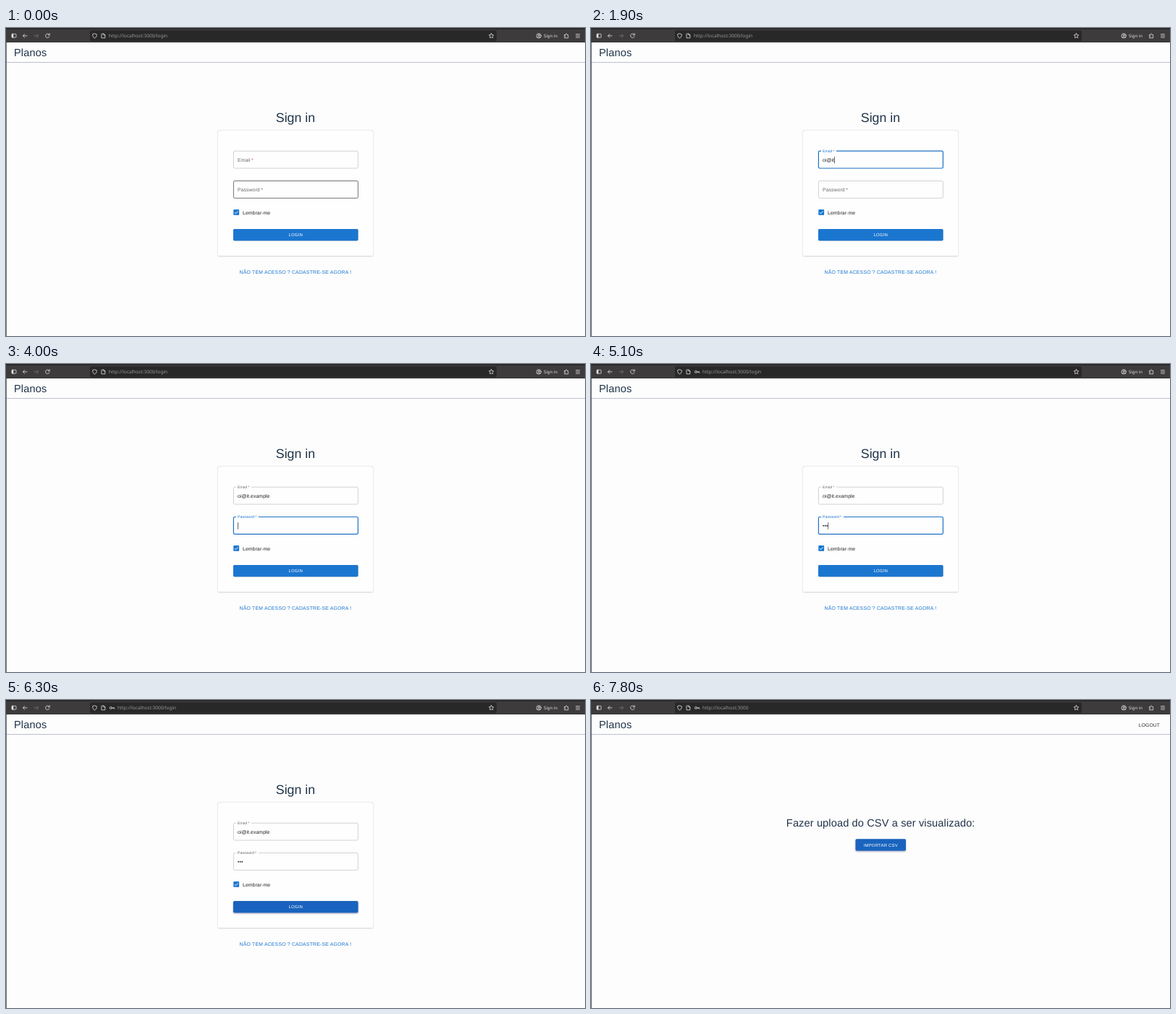
Animation of 800x426 px, one loop 8000 ms. Source, as an HTML page:

```html
<!DOCTYPE html>
<html lang="pt">
<head>
<meta charset="utf-8">
<title>Sign in</title>
<style>
  html, body { margin: 0; width: 100%; height: 100%; overflow: hidden; background: #fdfdfd; }
  svg { display: block; width: 800px; height: 426px; }
  text { font: 6.88px "Liberation Sans", Arial, sans-serif; letter-spacing: .00938em; text-rendering: geometricPrecision; white-space: pre; }
  .chrome text { font-family: "Noto Sans", sans-serif; letter-spacing: 0; }
  .icon { fill: none; stroke: #e2e0e2; stroke-width: .8; stroke-linecap: round; stroke-linejoin: round; }
  .dim { stroke: #777577; }
  .solid { fill: #e2e0e2; stroke: none; }
  .url { font-size: 6.5px; fill: #99979a; }
  .heading { font-size: 14.62px; letter-spacing: .00735em; fill: #20344a; }
  .title { font-size: 17.8px; letter-spacing: 0; }
  .mid { text-anchor: middle; }
  .body { fill: #222427; }
  .hint { fill: #a3a3a3; }
  .caps { letter-spacing: .02857em; }
  .white { font-size: 6.02px; fill: #fff; }
  .card { fill: #fefefe; filter: drop-shadow(0 .7px .7px #0005) drop-shadow(0 .3px 1px #0003); }
</style>
</head>
<body>
<svg viewBox="0 0 800 426">
  <defs><clipPath id="loginClip"><rect x="314" y="278" width="172.5" height="16.3" rx="1.7"/></clipPath></defs>
  <rect width="800" height="426" fill="#fdfdfd"/>

  <g class="chrome">
    <rect width="800" height="20" fill="#3d3b3c"/>
    <rect width="800" height="2" fill="#2b292a"/>
    <rect x="116" y="3.4" width="562" height="14.8" rx="1.8" fill="#292829"/>
    <g class="icon">
      <rect x="8" y="8.2" width="6" height="5" rx=".8"/><path class="solid" d="M8 8.2h2.3v5H8z"/>
      <path d="M29 10.8h-5.6m2.4-2.4-2.4 2.4 2.4 2.4"/>
      <path class="dim" d="M39 10.8h5.6m-2.4-2.4 2.4 2.4-2.4 2.4"/>
      <path d="M59.8 9.2a2.8 2.8 0 1 0 .3 2.4M60.3 7.6v2.1h-2.1"/>
      <path d="M122.5 7.8l2.8 1c0 2.6-.7 4.3-2.8 5.4-2.1-1.1-2.8-2.8-2.8-5.4z"/>
      <path d="M132.4 8h2.7l1.8 1.8v4h-4.5zM135 8v1.9h1.9"/>
      <path id="key" d="M146.4 10.9h3.4v1.2M148.3 10.9v1M146.4 10.9a1.5 1.5 0 1 0-3 0a1.5 1.5 0 1 0 3 0"/>
      <path d="M670.5 7.4l1 2.1 2.3.3-1.7 1.6.4 2.3-2-1.1-2 1.1.4-2.3-1.7-1.6 2.3-.3z"/>
      <circle cx="736.2" cy="10.8" r="3.2"/><circle cx="736.2" cy="9.9" r="1.1"/><path d="M734.2 13c.8-1.5 3.2-1.5 4 0"/>
      <path d="M771.7 9.5h1.6c-.5-2.2 2.4-2.2 1.9 0h1.5v4.3h-5v-1.5c1.7.4 1.7-1.9 0-1.4z"/>
      <path d="M787.5 8.6h5M787.5 10.8h5M787.5 13h5"/>
    </g>
    <text id="url" class="url" y="13.2"></text>
    <text x="743" y="13" style="font-size:6px" fill="#e2e0e2">Sign in</text>
  </g>

  <path d="M0 20h1v406H0z" fill="#6d6c6e"/>
  <path d="M1 47.6h799" stroke="#b9bdd0" stroke-width="1"/>
  <text class="heading" x="11" y="39.2">Planos</text>

  <g id="loginPage">
    <text class="heading title mid" x="400" y="129.5">Sign in</text>
    <rect class="card" x="293" y="142" width="214" height="173.5" rx="1.7"/>
    <g id="fields"></g>
    <rect x="314.3" y="251" width="7.8" height="7.8" rx=".9" fill="#1976d2"/>
    <path d="M315.9 255l1.6 1.7 3.1-3.4" fill="none" stroke="#fff" stroke-width=".95"/>
    <text class="body" x="327" y="257.7">Lembrar-me</text>
    <rect id="loginButton" x="314" y="278" width="172.5" height="16.3" rx="1.7"/>
    <circle id="ripple" cx="400.5" cy="286" fill="#fff" clip-path="url(#loginClip)"/>
    <text class="caps white mid" x="400.2" y="288.3">LOGIN</text>
    <text class="caps mid" x="400" y="339.8" fill="#1976d2">NÃO TEM ACESSO ? CADASTRE-SE AGORA !</text>
  </g>

  <g id="uploadPage">
    <text class="body caps" x="756.8" y="36.5" style="font-size:6.65px">LOGOUT</text>
    <text class="heading mid" x="400.2" y="175">Fazer upload do CSV a ser visualizado:</text>
    <rect id="uploadButton" x="365.5" y="192.2" width="69.5" height="16.3" rx="1.7"/>
    <text class="caps white mid" x="400.3" y="202.6">IMPORTAR CSV</text>
  </g>
</svg>

<script>
const LOOP = 8000;
const $ = id => document.getElementById(id);
const clamp = x => Math.min(1, Math.max(0, x));
const ramp = (t, start, length) => clamp((t - start) / length);
const easeOut = x => 1 - (1 - x) ** 3;
const smooth = x => x * x * (3 - 2 * x);
const mix = (a, b, p) => a + (b - a) * p;
const within = (t, [start, end]) => t >= start && t < end;
const show = (node, on) => node.setAttribute('visibility', on ? 'inherit' : 'hidden');

function add(parent, tag, attrs, text = '') {
  const node = document.createElementNS('http://www.w3.org/2000/svg', tag);
  for (const name in attrs) node.setAttribute(name, attrs[name]);
  node.textContent = text;
  parent.append(node);
  return node;
}

// "keys" holds the moment at which each character is typed.
const fieldSpecs = [
  { label: 'Email', top: 170, notch: 21, value: 'oi@it.example', hint: 'e-mail', star: '#cf5a50',
    hover: [200, 500], focus: [500, 3800], caretOff: [1100, 1200],
    keys: [1200, 1300, 1500, 1600, 1900, 2200, 2300, 2500, 2700, 2800, 3000, 3100, 3200] },
  { label: 'Password', top: 211.3, notch: 31, value: '•••', hint: '', star: '#85665f',
    hover: [0, 100], focus: [3800, 5600], caretOff: [4400, 4500],
    keys: [4500, 4600, 4700] }
];

function makeField(spec) {
  const { top } = spec, group = $('fields');
  const border = add(group, 'rect', { x: 314.4, y: top + .2, width: 172, height: 23.8, rx: 1.7, fill: 'none' });
  const gap = add(group, 'rect', { x: 318, y: top - 1, height: 2.4, fill: '#fefefe' });
  const label = add(group, 'text', {}, spec.label);
  const star = add(label, 'tspan', {}, '\u2009*');
  const hint = add(group, 'text', { class: 'hint', x: 320, y: top + 15 }, spec.hint);
  const value = add(group, 'text', { class: 'body', x: 320, y: top + 15 });
  const caret = add(group, 'rect', { y: top + 7.8, width: .7, height: 9.4, fill: '#222' });

  return t => {
    const focused = within(t, spec.focus);
    const lift = easeOut(ramp(t, spec.focus[0], 250));
    const typed = spec.keys.filter(key => t >= key).length;
    const color = focused ? '#1976d2' : '#6a6a6a';

    border.setAttribute('stroke', focused ? '#1f72c4' : within(t, spec.hover) ? '#5c5c5c' : '#c9c9c9');
    border.setAttribute('stroke-width', focused ? 1.2 : .85);
    gap.setAttribute('width', spec.notch * lift);
    label.setAttribute('transform', `translate(320 ${top + mix(14.7, 1.9, lift)}) scale(${mix(1, .75, lift)})`);
    label.setAttribute('fill', color);
    star.setAttribute('fill', lift ? color : spec.star);
    hint.setAttribute('opacity', typed ? 0 : lift);
    value.textContent = spec.value.slice(0, typed);
    caret.setAttribute('x', 320 + (typed ? value.getComputedTextLength() : 0));
    show(caret, focused && !within(t, spec.caretOff));
  };
}

function paintButton(button, hover) {
  const channel = (a, b) => Math.round(mix(a, b, hover));
  button.setAttribute('fill', `rgb(${channel(27, 25)},${channel(118, 99)},${channel(208, 190)})`);
  button.style.filter = `drop-shadow(0 ${mix(.6, 1, hover)}px ${mix(.6, 1.1, hover)}px rgba(${channel(0, 20)},${channel(0, 20)},${channel(0, 90)},.42))`;
}

const fields = fieldSpecs.map(makeField);

function draw(t) {
  const signedIn = t >= 6400, saved = t >= 4500;
  show($('loginPage'), !signedIn);
  show($('uploadPage'), signedIn);
  show($('key'), saved);
  $('url').setAttribute('x', saved ? 154 : 142);
  $('url').textContent = 'http://localhost:3000' + (signedIn ? '' : '/login');
  fields.forEach(drawField => drawField(t));

  paintButton($('loginButton'), smooth(ramp(t, 5450, 250)));
  paintButton($('uploadButton'), smooth(ramp(t, 7550, 250)));
  $('ripple').setAttribute('r', 87 * smooth(ramp(t, 5600, 550)));
  $('ripple').setAttribute('opacity', .2 * (1 - smooth(ramp(t, 5750, 550))));
}

function tick() {
  draw(performance.now() % LOOP);
  requestAnimationFrame(tick);
}
tick();
</script>
</body>
</html>
```
